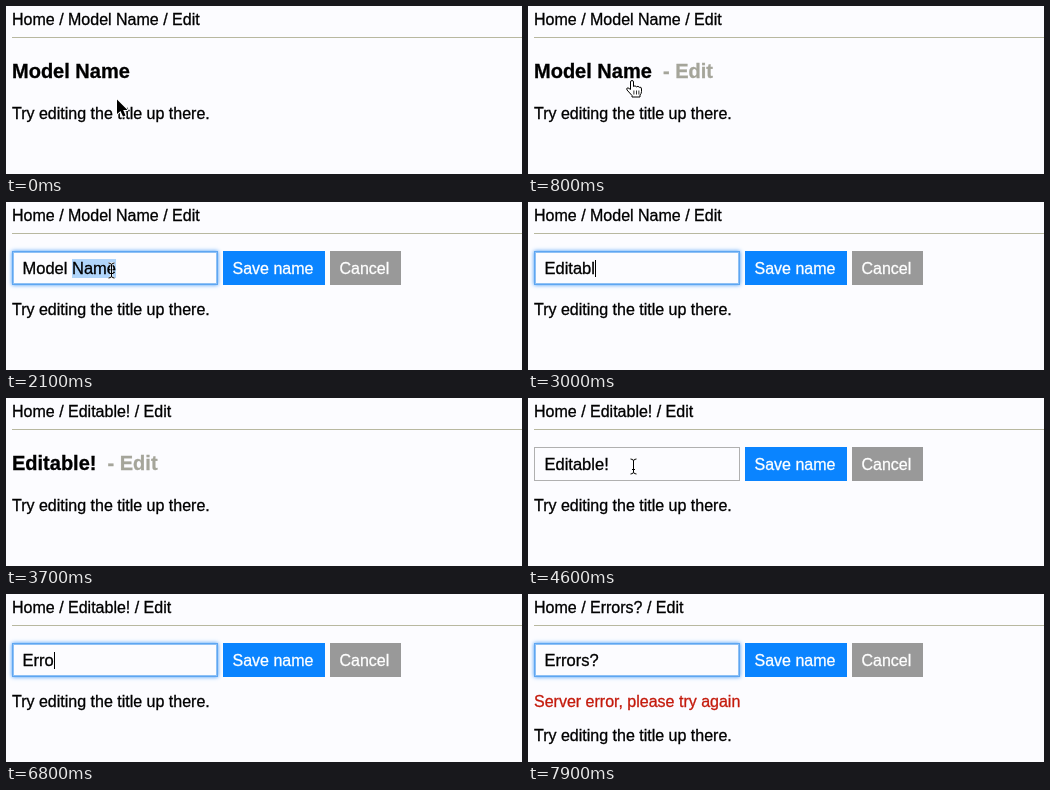
An HTML page with a canvas for the animation above (8000 ms loop, 516 px wide and 168 px high).

```html
<!DOCTYPE html>
<html lang="en">
<head>
<meta charset="utf-8">
<title>Inline title editing</title>
<style>
html, body { margin: 0; width: 516px; height: 168px; overflow: hidden; background: #fcfcff; }
canvas { display: block; }
</style>
</head>
<body>
<canvas id="stage" width="516" height="168"></canvas>
<script>
const ctx = document.getElementById('stage').getContext('2d');
const LOOP = 8000, STEP = 100;
const FAMILY = '"Liberation Sans", Arial, sans-serif';
const BODY = '16px ' + FAMILY, FIELD = '16.5px ' + FAMILY, TITLE = 'bold 20px ' + FAMILY;

// Pointer stops: time, shape, x, y; each holds until the next one.
const pointer = [
  [0, 'arrow', 110, 93], [100, 'arrow', 112, 99], [200, 'arrow', 107, 104], [300, 'arrow', 103, 107],
  [600, 'arrow', 103, 98], [700, 'hand', 102, 80], [800, 'hand', 102, 74],
  [1100, 'hand', 102, 70], [1200, 'hand', 102, 66],
  [1500, 'beam', 105, 68], [2400, 'none', 0, 0],
  [4100, 'hand', 102, 72], [4200, 'hand', 102, 66],
  [4500, 'beam', 105, 68], [6000, 'none', 0, 0]
];

// Page states: form, focus, selected range, caret.
const states = [
  [0, {}],
  [1500, { form: true }],
  [1700, { form: true, focus: true, caret: true }],
  [2000, { form: true, focus: true, sel: [6, 10] }],
  [2200, { form: true, focus: true, sel: [0, 10] }],
  [2400, { form: true, focus: true, caret: true }],
  [3300, {}],
  [4500, { form: true }],
  [5100, { form: true, focus: true, caret: true }],
  [5400, { form: true, focus: true, sel: [0, 8] }],
  [5600, { form: true, focus: true, sel: [0, 9] }],
  [6000, { form: true, focus: true, caret: true }],
  [7400, {}],
  [7700, { form: true, focus: true, error: true }]
];

const latest = (list, t) => list.filter(item => item[0] <= t).pop();
const clamp = v => Math.max(0, Math.min(1, v));
const typed = (word, t, start) => word.slice(0, Math.floor((t - start) / STEP) + 1);

function fieldValue(t) {
  if (t < 2400) return 'Model Name';
  if (t < 6000) return typed('Editable!', t, 2400);
  if (t < 6400) return t < 6200 ? 'S' : 'Se';
  return t < 6500 ? '' : typed('Errors?', t, 6500);
}

// A hairline outline gives the slightly heavy, smoothed letters.
function text(str, x, y, font = BODY, color = '#000') {
  ctx.font = font;
  ctx.fillStyle = ctx.strokeStyle = color;
  ctx.lineWidth = 0.3;
  ctx.fillText(str, x, y);
  ctx.strokeText(str, x, y);
}

function width(str, font) {
  ctx.font = font;
  return ctx.measureText(str).width;
}

function rect(x, y, w, h, color) {
  ctx.fillStyle = color;
  ctx.fillRect(x, y, w, h);
}

function drawTitle(name, t) {
  text(name, 6, 72, TITLE);
  const since = t < 3300 ? 600 : t < 7400 ? 3300 : 7400;
  ctx.globalAlpha = clamp((t - since) / 200);
  text('- Edit', 6 + width(name + '  ', TITLE), 72, TITLE, '#a5a59a');
  ctx.globalAlpha = 1;
}

function drawForm(state, value) {
  if (state.focus) {
    ctx.save();
    ctx.shadowColor = '#3f98f5';
    ctx.shadowBlur = 4;
    rect(6, 49, 206, 34, '#5ea6f2');
    ctx.restore();
    rect(7, 50, 204, 32, '#8fc1f5');
    rect(8, 51, 202, 30, '#fcfcff');
  } else {
    rect(6, 49, 206, 34, '#b0b0b0');
    rect(7, 50, 204, 32, '#fcfcff');
  }
  if (state.sel) {
    const [from, to] = state.sel.map(n => 16.5 + width(value.slice(0, n), FIELD));
    rect(from, 57, to - from, 19, '#b0d5fa');
  }
  text(value, 16.5, 72, FIELD);
  if (state.caret) rect(Math.round(16.5 + width(value, FIELD)), 58, 1, 17, '#000');
  rect(217, 49, 102, 34, '#0a84ff');
  text('Save name', 226.5, 72, BODY, '#fff');
  rect(324, 49, 71, 34, '#999');
  text('Cancel', 333.5, 72, BODY, '#fff');
}

const shapes = {
  arrow: new Path2D('M.5 0V14.5L4 11.5 6.5 17 9 16 6.7 10.5H11Z'),
  hand: new Path2D('M0 1.5Q0 0 1.5 0T3 1.5V6Q4.5 4.5 6 6.3 7.6 5 8.8 6.8 11 6 11 8.5V11Q11 13 9.5 14.5V16.5H1.5V15L-3.5 9.5Q-4.5 7.5-2.5 7.3L0 9Z'),
  beam: new Path2D('M-3-7.5Q0-7.5 0-5.5 0-7.5 3-7.5M0-5.5V5.5M-3 7.5Q0 7.5 0 5.5 0 7.5 3 7.5M-1.5 3H1.5')
};

function drawPointer([, kind, x, y]) {
  if (kind === 'none') return;
  const shape = shapes[kind];
  ctx.save();
  ctx.translate(x + 0.5, y + 0.5);
  ctx.lineJoin = 'round';
  ctx.strokeStyle = '#fff';
  ctx.lineWidth = 2;
  ctx.stroke(shape);
  ctx.fillStyle = kind === 'arrow' ? '#000' : '#fff';
  if (kind !== 'beam') ctx.fill(shape);
  if (kind !== 'arrow') {
    ctx.strokeStyle = '#000';
    ctx.lineWidth = 1;
    ctx.stroke(shape);
  }
  if (kind === 'hand') for (const dx of [3, 5.5, 8]) rect(dx, 10, 0.8, 4, '#000');
  ctx.restore();
}

function draw(t) {
  const state = latest(states, t)[1];
  const name = t < 3300 ? 'Model Name' : t < 7400 ? 'Editable!' : 'Errors?';
  rect(0, 0, 516, 168, '#fcfcff');
  text(`Home / ${name} / Edit`, 6, 19);
  rect(6, 31, 510, 1, '#b8b8a0');
  if (state.form) drawForm(state, fieldValue(t));
  else drawTitle(name, t);
  if (state.error) text('Server error, please try again', 6, 113, BODY, '#c41a0c');
  text('Try editing the title up there.', 6, state.error ? 147 : 113);
  drawPointer(latest(pointer, t));
}

const start = performance.now();
function tick() {
  const t = (performance.now() - start) % LOOP;
  draw(Math.floor(t / STEP) * STEP);
  requestAnimationFrame(tick);
}
tick();
</script>
</body>
</html>
```
